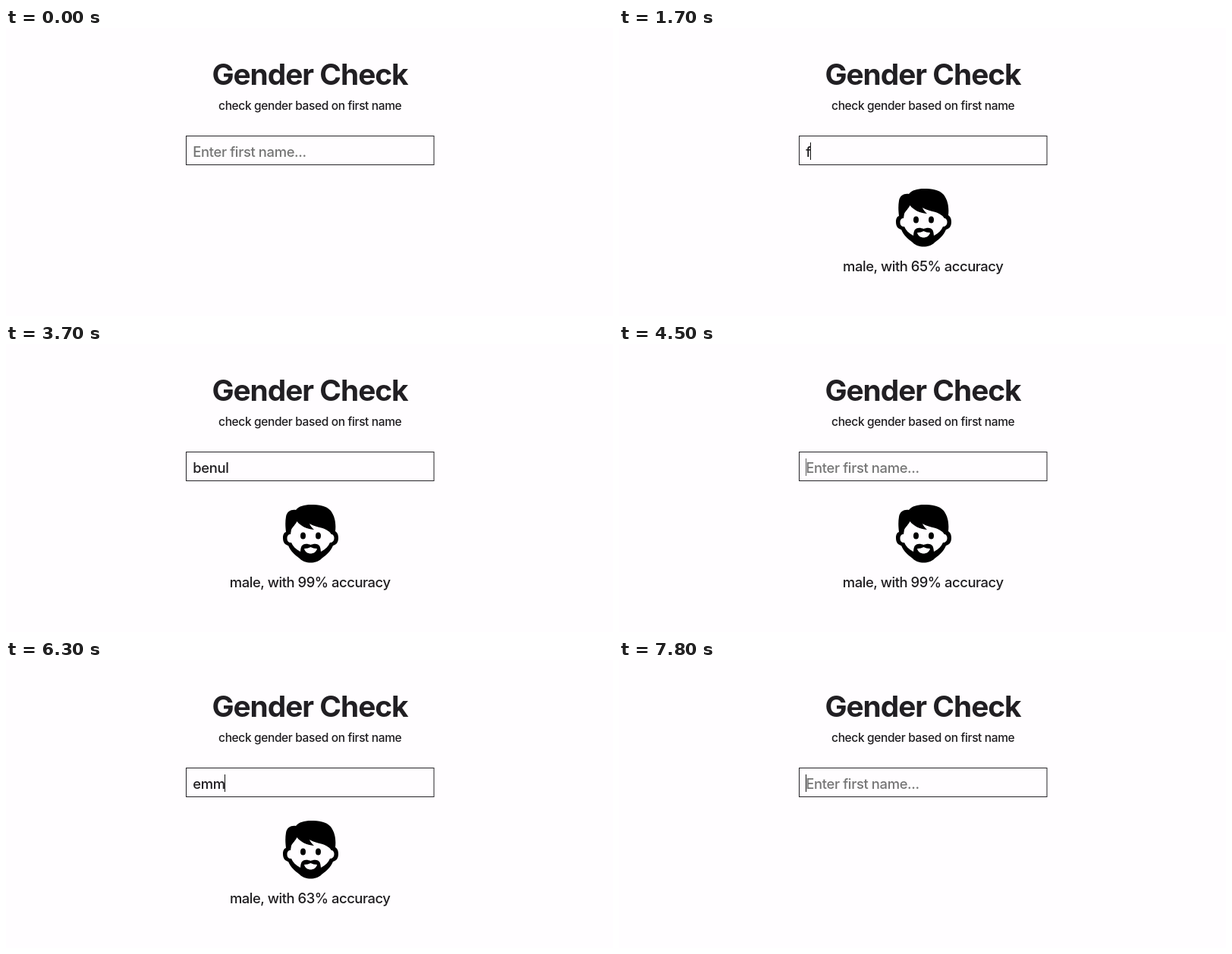
An HTML page that plays this animation: 800 by 380 pixels, repeating every 8000 ms.

```html
<!DOCTYPE html>
<html lang="en">
<head>
<meta charset="utf-8">
<title>Gender Check</title>
<style>
  html, body { margin: 0; width: 100%; height: 100%; overflow: hidden; background: #fffdff; }
  svg { display: block; width: 800px; height: 380px; }
  text {
    font-family: Inter, Roboto, sans-serif;
    font-optical-sizing: none;
    font-size: 18.4px;
    font-weight: 450;
    letter-spacing: -.45px;
    fill: #1f1d20;
  }
  .center { text-anchor: middle; }
  .title { font-size: 38.8px; font-weight: 700; letter-spacing: -1px; fill: #211f23; }
  .subtitle { font-size: 15.5px; letter-spacing: -.37px; }
  #field { letter-spacing: -.36px; }
  #field.placeholder { fill: #757575; }
</style>
</head>
<body>
<svg viewBox="0 0 800 380">
  <text class="center title" x="400.5" y="75">Gender Check</text>
  <text class="center subtitle" x="400.7" y="108">check gender based on first name</text>
  <rect x="237.5" y="142.5" width="326.5" height="38" fill="none" stroke="#252327"/>
  <text id="field" x="246.3" y="169.8"></text>
  <path id="caret" d="M0 151V174" stroke="#111"/>
  <g id="result">
    <path d="M369 248C366 249 365 252 365 256C365 262 368 265 372 266C375 273 380 278 387 283
      C391 287 396 288.5 401.5 288.5C407 288.5 412 287 416 283C423 278 428 273 431 266
      C435 265 438 262 438 256C438 252 437 249 434 247C435 238 434 228 428 220
      C422 213 412 212 402 212C393 212 386 214 382 219C376 218 370 221 369 228C368 234 368 240 369 248Z"/>
    <path fill="#fffdff" d="M370.5 256C370.5 253 372 251 375 251L376 245C378 241 381 239 383.5 234
      C388 240 396 244 406 245C403 242 401 240 400 237C407 242 417 241 425 247
      C427 248 428 250 428.5 251C431 251 432.5 253 432.5 256C432.5 260 430 262 427 262
      C425 267 421 271 415 274C414.5 269 414 266 411 264.5C408 263 404 264 401.5 265
      C399 264 395 263 392 264.5C389 266 388.5 269 388 274C382 271 378 267 376 262C372 262 370.5 260 370.5 256Z"/>
    <ellipse cx="391.5" cy="253" rx="3.5" ry="4.5"/>
    <ellipse cx="411.5" cy="253" rx="3.5" ry="4.5"/>
    <path fill="#fffdff" d="M393 270Q398 270 401.5 268Q405 270 410 270C409 274.5 405 276.5 401.5 276.5C398 276.5 394 274.5 393 270Z"/>
    <text id="verdict" class="center" x="400.7" y="320.5"></text>
  </g>
</svg>
<script>
const LOOP = 8000;
const [field, caret, result, verdict] =
  ['field', 'caret', 'result', 'verdict'].map(id => document.getElementById(id));

// Each entry: start time, then the typed text.
const edits = [];
const addEdit = (time, text) => edits.push([time, text]);
const type = (name, times) => times.forEach((time, i) => addEdit(time, name.slice(0, i + 1)));
const erase = (name, start, keep = 0) => {
  for (let length = name.length - 1; length >= keep; length--, start += 100) {
    addEdit(start, name.slice(0, length));
  }
};

addEdit(0, '');
type('frolu', [200, 400, 600, 1000, 1200]);
erase('frolu', 1400, 1);
addEdit(1900, '');
type('benul', [2500, 2700, 2900, 3000, 3200]);
erase('benul', 4100);
type('emmu', [5900, 6100, 6200, 6500]);
erase('emmu', 7500);

// Accuracy in percent, 0 hides the result.
const accuracy = [
  [0, 0], [300, 65], [1200, 99], [1600, 65], [2000, 0],
  [2600, 51], [3300, 99], [4600, 0], [6000, 63], [7800, 0]
];

// Caret switches; those with a fade take three steps of 100 ms.
const blinks = [
  [0, 0, false], [100, 1, false], [3500, 0, true], [4000, 1, true], [4500, 0, true],
  [5000, 1, true], [5500, 0, true], [5900, 1, false], [7000, 0, true], [7500, 1, true]
];

const current = (list, time) => list.findLast(entry => entry[0] <= time);

function caretOpacity(time) {
  const [start, on, fades] = current(blinks, time);
  const progress = fades ? Math.min(1, (Math.floor((time - start) / 100) + 1) / 3) : 1;
  return on ? progress : 1 - progress;
}

function draw(now) {
  const time = now % LOOP;
  const text = current(edits, time)[1];
  const percent = current(accuracy, time)[1];

  field.textContent = text || 'Enter first name...';
  field.classList.toggle('placeholder', !text);
  const end = 246 + (text ? field.getComputedTextLength() : 0);
  caret.setAttribute('transform', `translate(${Math.floor(end) + .5})`);
  caret.setAttribute('opacity', caretOpacity(time));
  result.style.display = percent ? '' : 'none';
  verdict.textContent = `male, with ${percent}% accuracy`;
}

const origin = performance.now();
function tick() {
  draw(performance.now() - origin);
  requestAnimationFrame(tick);
}
tick();
</script>
</body>
</html>
```
